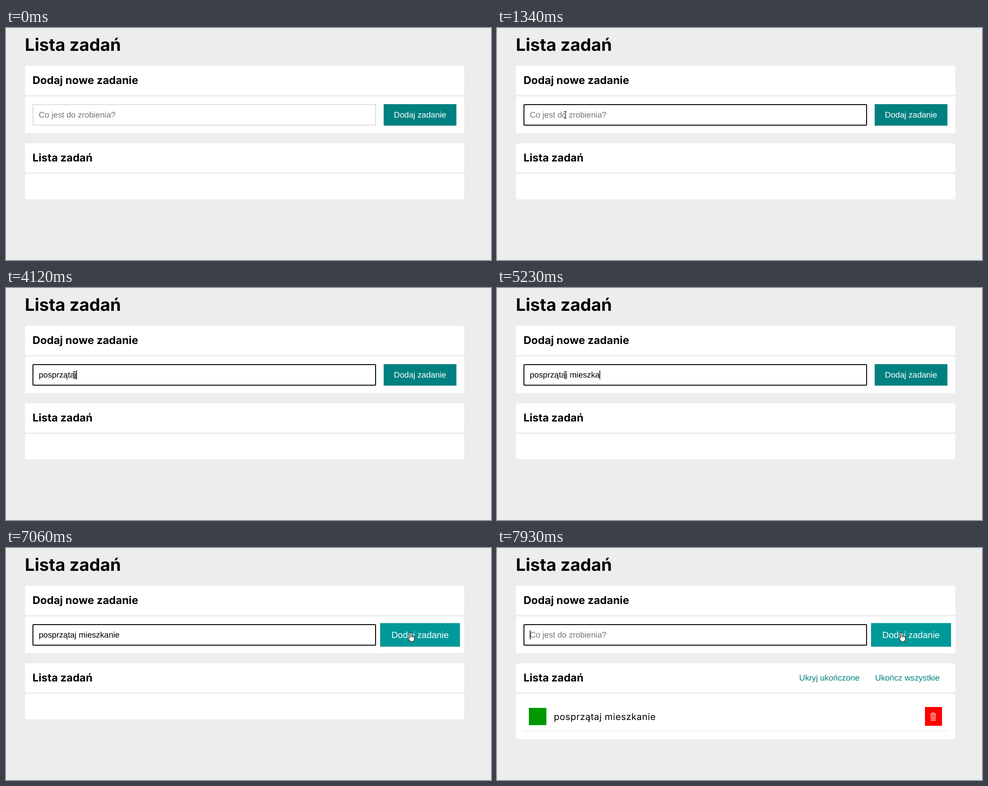
An HTML page that plays this animation: 1080 by 518 pixels, repeating every 8 s.

```html
<!DOCTYPE html>
<html lang="pl">
<head>
<meta charset="utf-8">
<title>Lista zadań</title>
<style>
  html, body { margin: 0; width: 100%; height: 100%; overflow: hidden; background: #ededed; }
  svg { display: block; font: 18.2px "Liberation Sans", Arial, sans-serif; text-rendering: geometricPrecision; }
  text { white-space: pre; }
  .panel { fill: #fff; }
  .title, .heading, .task { font-family: Inter, sans-serif; }
  .title { font-size: 38.4px; font-weight: 700; }
  .heading { font-size: 24px; font-weight: 700; }
  .task { font-size: 20.5px; letter-spacing: .5px; }
  .link { fill: teal; }
</style>
</head>
<body>
<svg width="1080" height="518" viewBox="0 0 1080 518">
  <rect width="1080" height="518" fill="#ededed"/>
  <text class="title" x="42" y="51">Lista zadań</text>
  <g class="panel">
    <rect x="42.5" y="84.5" width="978" height="65" rx="3"/>
    <rect x="42.5" y="153" width="978" height="81.5" rx="3"/>
    <rect x="42.5" y="257.5" width="978" height="65" rx="3"/>
    <rect id="list" x="42.5" y="326" width="978" height="56.5" rx="3"/>
  </g>
  <text class="heading" x="59" y="125">Dodaj nowe zadanie</text>
  <text class="heading" x="59" y="298">Lista zadań</text>

  <rect id="field" x="60" y="171" width="763" height="46" fill="#fff" stroke-width="2"/>
  <text id="entry" x="73" y="200"></text>
  <rect id="caret" y="184" width="1.5" height="20"/>

  <g id="button">
    <rect id="buttonFace" x="-81" y="-24" width="162" height="48"/>
    <text y="6" text-anchor="middle" fill="#fff">Dodaj zadanie</text>
  </g>

  <g id="added">
    <text class="link" x="673" y="296">Ukryj ukończone</text>
    <text class="link" x="842" y="296">Ukończ wszystkie</text>
    <rect x="71" y="357" width="39" height="38.5" fill="#090"/>
    <text class="task" x="126.5" y="384">posprzątaj mieszkanie</text>
    <rect x="953" y="355" width="38" height="42" fill="red"/>
    <path d="M965 370.5h13M969 370v-2h5v2M966 372.5l1.2 13h8.6l1.2-13zM969 374l.5 10M971.5 374v10M974 374l-.5 10"
          fill="none" stroke="#ffe4d8" stroke-width="1.1"/>
    <path d="M59 408.5H1002.5" stroke="#ddd"/>
  </g>

  <g id="pointer">
    <path id="arrow" d="M0 0V16.5L3.8 13L6.5 18.7L9 17.6L6.4 12H11.7Z" fill="#fff" stroke="#000"/>
    <g id="beam" fill="none">
      <path d="M-3-7.5H-1L0-6.5L1-7.5H3M0-6.5V6.5M-3 7.5H-1L0 6.5L1 7.5H3" stroke="#fff" stroke-width="2.6"/>
      <path d="M-3-7.5H-1L0-6.5L1-7.5H3M0-6.5V6.5M-3 7.5H-1L0 6.5L1 7.5H3" stroke="#000" stroke-width="1.2"/>
    </g>
    <path id="hand" fill="#fff" stroke="#000" stroke-linejoin="round"
          d="M-1.5 13V1a1.5 1.5 0 0 1 3 0V7q1.5-1 3 .5q1.5-.8 3 .6q2-.4 2 1.4V14q0 2-1.5 4V20H-.5V18q-3-3-5-7q.6-2 2.5-.6zM1.5 7v4M4.5 7.5V11M7.5 8.1V11"/>
  </g>
</svg>
<script>
const LOOP = 8000, BLINK = 540;
const FOCUS = 790, PRESS = 7600, ADD = 7730, HOVER = 6810;
const TASK = "posprzątaj mieszkanie";
const keyTimes = [1870, 2010, 2200, 2330, 2460, 2650, 2910, 3850, 3920, 4120, 4240,
  4380, 4510, 4640, 4710, 4910, 4970, 5170, 5250, 5350, 5430];
const caretResets = [FOCUS, ...keyTimes, 2980, ADD];

const easeOut = u => 1 - (1 - u) ** 2;
const easeIn = u => u ** 1.6;
// time, x, y, easing towards this point
const route = [
  [210, 736, 461], [520, 94, 195, easeOut], [790, 94, 195, easeOut], [1190, 152, 194, easeOut],
  [6170, 152, 194, easeOut], [6520, 507, 195, easeIn], [7000, 900, 189, easeOut]
];

const $ = id => document.getElementById(id);
const set = (id, attrs) => {
  for (const name in attrs) $(id).setAttribute(name, attrs[name]);
};
const show = (id, on) => set(id, { visibility: on ? "visible" : "hidden" });

function pointerAt(t) {
  const next = route.findIndex(stop => stop[0] > t);
  if (next < 0) return route[route.length - 1].slice(1);
  if (next === 0) return route[0].slice(1);
  const [t0, x0, y0] = route[next - 1], [t1, x1, y1, ease] = route[next];
  const k = ease((t - t0) / (t1 - t0));
  return [x0 + (x1 - x0) * k, y0 + (y1 - y0) * k];
}

function drawPointer(t) {
  const [x, y] = pointerAt(t);
  const inRow = y >= 170 && y <= 218;
  const shape = inRow && x >= 59 && x <= 824 ? "beam"
    : inRow && x >= 841 && x <= 1003 ? "hand" : "arrow";
  set("pointer", { transform: `translate(${x} ${y})` });
  for (const id of ["arrow", "beam", "hand"]) show(id, t >= route[0][0] && id === shape);
}

function drawField(t) {
  const focused = t >= FOCUS && (t < PRESS || t >= ADD);
  const typed = t < ADD ? TASK.slice(0, keyTimes.filter(k => k <= t).length) : "";
  set("field", { stroke: focused ? "#000" : "#ddd", rx: focused ? 1.5 : 0 });
  set("entry", { fill: typed ? "#000" : "#757575" });
  $("entry").textContent = typed || "Co jest do zrobienia?";
  const sinceReset = t - Math.max(...caretResets.filter(r => r <= t));
  show("caret", focused && Math.floor(sinceReset / BLINK) % 2 === 0);
  set("caret", { x: 73 + (typed ? $("entry").getComputedTextLength() - .5 : 0) });
}

function drawButton(t) {
  const hover = easeOut(Math.min(1, Math.max(0, (t - HOVER) / 300)));
  const tone = Math.round(128 + 25 * hover);
  set("button", { transform: `translate(922 194) scale(${1 + .1 * hover})` });
  set("buttonFace", { fill: `rgb(0,${tone},${tone})` });
}

function draw(now) {
  const t = now % LOOP;
  drawField(t);
  drawButton(t);
  drawPointer(t);
  show("added", t >= ADD);
  set("list", { height: t >= ADD ? 101 : 56.5 });
  requestAnimationFrame(draw);
}
draw(0);
</script>
</body>
</html>
```
